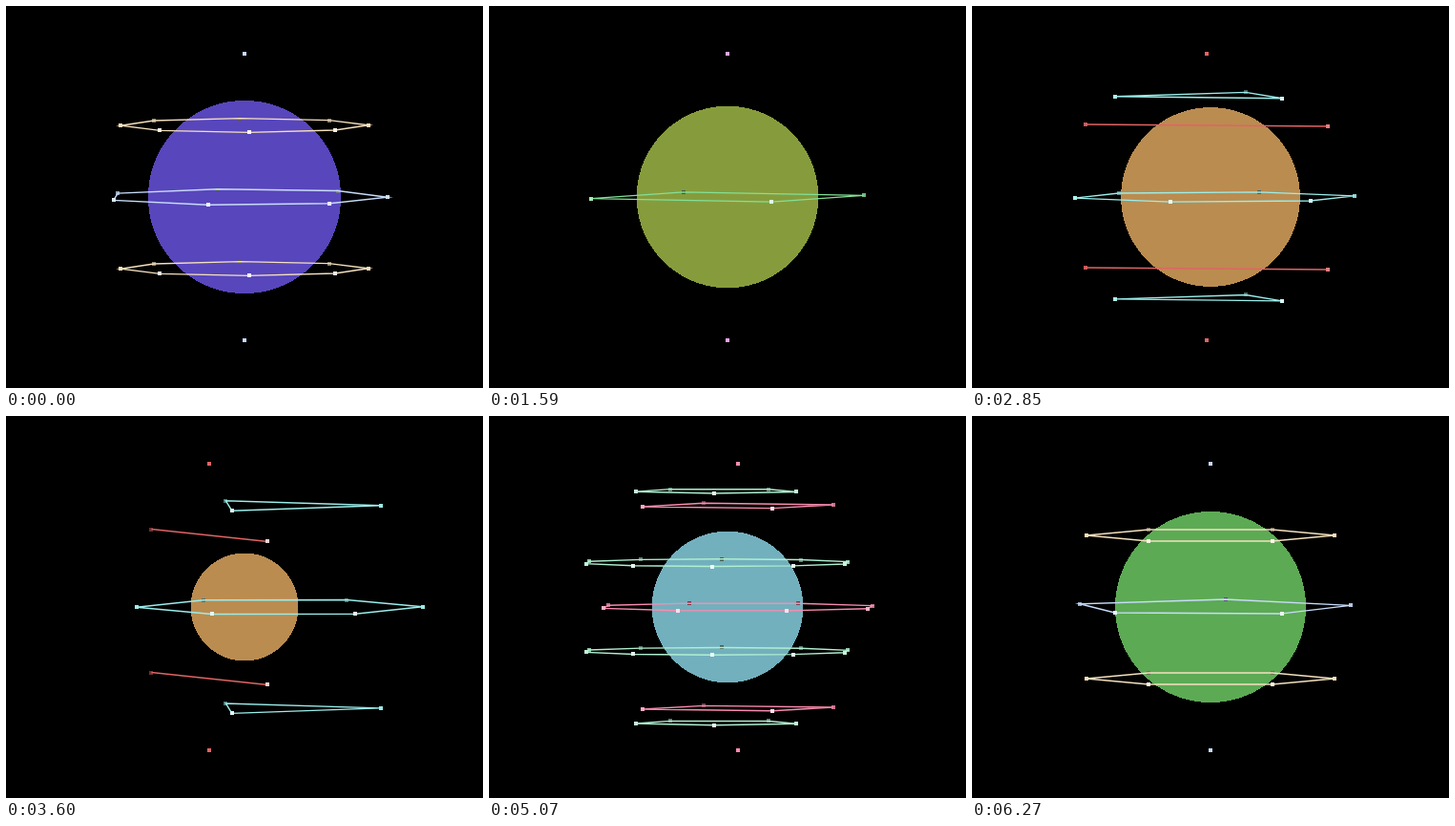
Recreate the animation shown at these times as an HTML page with a canvas. Size 500 by 400 pixels, loop 6.3 s.

```html
<!DOCTYPE html>
<html lang="en">
<head>
<meta charset="utf-8">
<title>Counter-rotating spheres</title>
<style>
  html, body { margin: 0; width: 500px; height: 400px; overflow: hidden; background: #000; }
  canvas { display: block; }
</style>
</head>
<body>
<canvas id="stage" width="500" height="400"></canvas>
<script>
const ctx = document.getElementById('stage').getContext('2d');
const STEP_MS = 30, STEPS = 210;
const CX = 250, CY = 200, RADIUS = 150;
const rad = deg => deg * Math.PI / 180;
const sin = deg => Math.sin(rad(deg));
const cos = deg => Math.cos(rad(deg));

// Each state holds from its step on: bands and points per level, disc, two line colours.
const states = [
  { from: 0,   bands: 2, points: 7, disc: '#5846bc', a: [200, 220, 250], b: [245, 225, 190] },
  { from: 40,  bands: 1, points: 3, disc: '#869c3c', a: [240, 165, 225], b: [130, 225, 150] },
  { from: 60,  bands: 3, points: 2, disc: '#ba8c50', a: [225, 100, 100], b: [155, 238, 235] },
  { from: 140, bands: 7, points: 3, disc: '#4a6ea8', a: [255, 150, 215], b: [175, 235, 195] },
  { from: 160, bands: 4, points: 4, disc: '#72b0be', a: [250, 140, 175], b: [175, 240, 208] },
  { from: 180, bands: 2, points: 5, disc: '#5caa54', a: [200, 220, 250], b: [245, 225, 190] }
];

const css = c => `rgb(${c.map(Math.round).join(',')})`;

// Near points fade to white, far points to a dark shade.
function shade(color, depth) {
  return css(color.map(v => depth < 0 ? v + (255 - v) * -depth * 0.8 : v * (1 - 0.6 * depth)));
}

function disc(r, color) {
  ctx.fillStyle = color;
  for (let y = -Math.ceil(r); y < r; y++) {
    const d = r * r - (y + 0.5) ** 2;
    if (d <= 0) continue;
    const w = Math.round(Math.sqrt(d));
    ctx.fillRect(CX - w, CY + y, 2 * w, 1);
  }
}

function marker(x, y, color) {
  ctx.fillStyle = color;
  ctx.fillRect(Math.round(x) - 2, Math.round(y) - 2, 4, 4);
}

function ring(cx, lat, count, turn, tilt, color) {
  const y0 = CY - RADIUS * sin(lat);
  const dots = Array.from({ length: count }, (_, i) => {
    const angle = turn + 360 * i / count;
    const depth = sin(angle);
    return { x: cx + RADIUS * cos(lat) * cos(angle), y: y0 - tilt * cos(lat) * depth, depth };
  });
  const mark = d => marker(d.x, d.y, shade(color, d.depth));
  dots.filter(d => d.depth > 0).forEach(mark);
  ctx.beginPath();
  dots.forEach(d => ctx.lineTo(d.x, d.y));
  ctx.closePath();
  ctx.strokeStyle = css(color);
  ctx.lineWidth = 1.4;
  ctx.stroke();
  dots.filter(d => d.depth <= 0).forEach(mark);
}

function sphere(cx, bands, points, turn, tilt, color) {
  for (let i = 1; i < bands; i++) {
    ring(cx, 90 - 180 * i / bands, points * Math.min(i, bands - i), turn, tilt, color);
  }
}

function draw(k) {
  const s = states.filter(state => state.from <= k).pop();
  const turn = 2 * k;
  const pull = Math.max(0, -sin(turn));
  const shift = -50 * pull * sin(2 * turn);
  const tilt = 8 + 4.5 * sin(6 * k);

  ctx.fillStyle = '#000';
  ctx.fillRect(0, 0, 500, 400);
  disc((100 + 5 * sin(12 * k)) * (1 - pull / 2), s.disc);

  sphere(CX + shift, s.bands, s.points, -turn, tilt, s.a);
  for (const y of [CY - RADIUS, CY + RADIUS]) marker(CX + shift, y, css(s.a));
  sphere(CX - shift, s.bands + 1, s.points + 1, turn, tilt, s.b);
}

function tick() {
  draw(Math.floor(performance.now() / STEP_MS) % STEPS + 1);
  requestAnimationFrame(tick);
}
tick();
</script>
</body>
</html>
```
